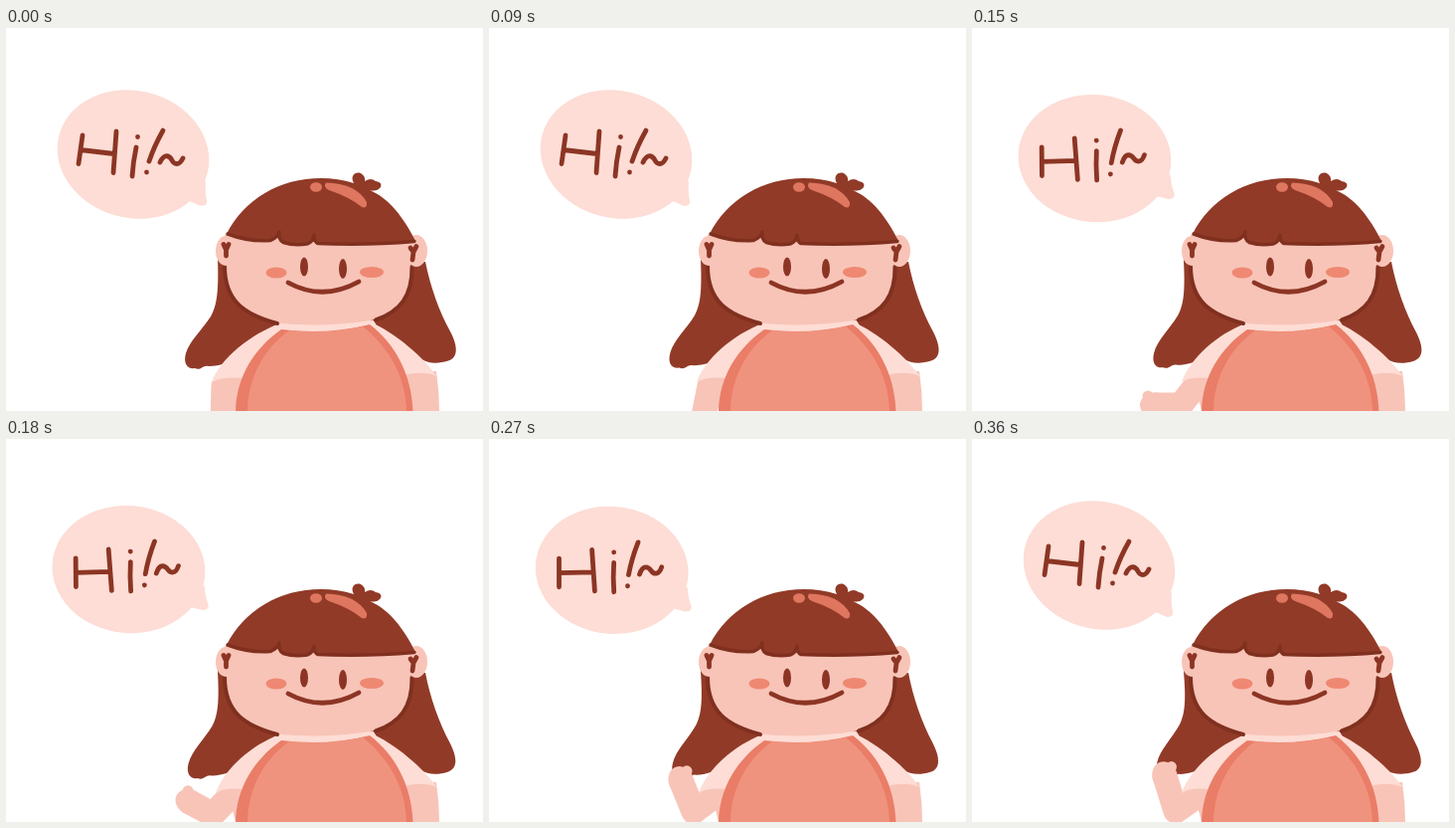
These frames come from a looping animation (480 px wide and 385 px high, 660 ms). An HTML page:

```html
<!DOCTYPE html>
<html lang="en">
<head>
<meta charset="utf-8">
<title>Hi!</title>
<style>
  html, body { margin: 0; width: 100%; height: 100%; overflow: hidden; background: #fff; }
  svg { display: block; width: 480px; height: 385px; }
  .line { fill: none; stroke: #8c3524; stroke-width: 4.8; stroke-linecap: round; stroke-linejoin: round; }
  .edge { fill: none; stroke: #80301f; stroke-width: 4; stroke-linecap: round; stroke-linejoin: round; }
  .hair { fill: #913a27; }
  .skin { fill: #f8c4b8; }
  .pale { fill: #fdddd5; }
  .ink { fill: #8c3524; }
  .blush { fill: #ef8872; }
  .shine { fill: #df7660; }
  .limb { fill: none; stroke: #f8c4b8; stroke-width: 25; stroke-linecap: round; stroke-linejoin: round; }
</style>
</head>
<body>
<svg viewBox="0 0 480 385">
  <g id="bubble">
    <ellipse class="pale" cx="128" cy="127" rx="77" ry="64" transform="rotate(14 128 127)"/>
    <path class="pale" d="M170 172Q182 173 187 175L195 178.500Q203 180 202 173Q200 166 201 154Z"/>
    <path class="line" d="M77 108L73 136.500M75 122.500L109 126.500M111 104L108 145.500M131 120Q128 134 127 149M132.500 109.500v.1M158 103Q149 119 144 134M141.500 145v.1M155 135C160 125 165 129 167 133S174 139 178 131"/>
  </g>

  <path class="hair" id="leftHair" d="M213 230C214 262 213 278 206 290C197 304 185 314 181 327C178 338 183 343 190 342C196 345 198 338 204 340Q212 340 222 337L280 300L225 230Z"/>
  <path class="hair" id="rightHair" d="M422 235C427 260 436 285 447 305C456 322 454 332 445 334.500C434 338 425 337 418 333L365 297L405 235Z"/>

  <path class="skin" d="M222 350H242L231 385Z"/>
  <path class="limb" id="arm"/>
  <g id="hand">
    <ellipse class="skin" rx="15" ry="12.500"/>
    <path class="limb" style="stroke-width:11" d="M2 4L7 9"/>
  </g>
  <path class="skin" d="M400 345H433Q436 365 436 385H400Z"/>
  <path class="pale" id="sleeve"/>
  <path class="pale" d="M365 295C392 306 421 332 433.500 350Q420 344 400 349L340 310Z"/>
  <path class="pale" d="M273 296L370 294L385 320H255Z"/>
  <path fill="#ea7d68" d="M231 385C232 350 250 322 277 303Q323 309 366 298C392 318 408 348 409.500 385Z"/>
  <path fill="#f0937e" d="M243 385C244 350 260 322 285 304Q323 308 359 300C386 322 402 350 403 385Z"/>

  <path class="skin" d="M220 208V238C219 277 240 288 275 297Q322 301 367 294C398 286 410 269 408 238V210Z"/>
  <path class="edge" d="M220 239C220 275 240 288 273 297M408.500 240C409 270 396 285 372 293.500"/>
  <ellipse class="skin" cx="221" cy="224" rx="10" ry="15"/>
  <ellipse class="skin" cx="413" cy="224" rx="11" ry="16"/>
  <path class="line" d="M219 217.500L221.500 223L224 217.500M221.500 223V229M407 221L410 225L413 219.500M410 225L409 233"/>

  <path class="hair" d="M222 207C240 172 275 151 317 151Q334 151 350 156C346 149 351 144 357 146Q362 149 361 154Q367 150 372 154Q379 155 377 160Q373 165 366 163C385 171 400 190 412 214Q365 219 313 218Q310 215 310 207Q309 215 303 217Q285 221 275 213V205Q273 212 266 214Q244 215 222 207Z"/>
  <path class="edge" style="stroke-width:3.500" d="M223 207Q244 215 266 213.500Q273 211 275 205Q274 213 279 215.500Q290 219 303 217Q309 215 310 208Q310 215 314 216.500Q365 218.500 411 214.500"/>
  <ellipse class="shine" cx="312" cy="160" rx="6" ry="4.800"/>
  <path class="shine" d="M322 155.500Q352 156 363 175Q364 182 358 180Q346 170 325 163Q319 160 322 155.500Z"/>

  <ellipse class="ink" cx="300" cy="240" rx="4" ry="9.500"/>
  <ellipse class="ink" cx="339" cy="242" rx="4" ry="10"/>
  <path class="line" d="M284 256Q319 275 355 255"/>
  <ellipse class="blush" cx="272" cy="246" rx="10.500" ry="5.500"/>
  <ellipse class="blush" cx="368" cy="245.500" rx="12" ry="5.500"/>
</svg>
<script>
  const LOOP = 660, STEP = 30, LAST = 12;
  const part = id => document.getElementById(id);
  const set = (id, name, value) => part(id).setAttribute(name, value);

  // step, elbow x, elbow y, hand x, hand y
  const armKeys = [
    [0, 218, 395, 218, 425],
    [2, 218, 395, 218, 425],
    [4, 214, 384, 202, 389],
    [5, 210, 379, 184, 379],
    [7, 206, 376, 186, 351],
    [10, 206, 374, 197, 340],
    [12, 205, 374, 194, 339]
  ];
  // Bubble tilt in degrees and drop in pixels for each swing
  const swings = [[5, 0], [8.5, 0], [8, 1]];

  function armPose(step) {
    const i = Math.max(1, armKeys.findIndex(key => key[0] >= step));
    const a = armKeys[i - 1], b = armKeys[i];
    const mix = (step - a[0]) / (b[0] - a[0]);
    return a.map((v, n) => v + (b[n] - v) * mix).slice(1);
  }

  function draw(step) {
    // Two steps tilted, two steps at rest
    const tilted = Math.floor((step + 1) / 2) % 2;
    const [tilt, drop] = tilted ? swings[Math.floor(step / 4)] : [0, 0];
    set('bubble', 'transform', `translate(0 ${drop}) rotate(${-tilt} 153 160)`);

    const sway = step * 0.28;
    set('leftHair', 'transform', `translate(0 ${-sway}) rotate(${-sway} 215 240)`);
    set('rightHair', 'transform', `rotate(${step * 0.06} 415 240)`);

    const [ex, ey, hx, hy] = armPose(step);
    const lift = Math.min(1, Math.max(0, (step - 2) / 2));
    const angle = Math.atan2(hy - ey, hx - ex) * 180 / Math.PI;
    set('arm', 'd', `M${219 + 6 * lift} 360L${ex} ${ey}L${hx} ${hy}`);
    set('hand', 'transform', `translate(${hx} ${hy}) rotate(${angle})`);

    const cuff = 207 + 4 * lift;
    set('sleeve', 'd', `M275 297C247 308 ${cuff + 9} 331 ${cuff} 356Q222 349 242 353L290 310Z`);
  }

  function tick() {
    draw(Math.min(LAST, Math.floor(performance.now() % LOOP / STEP)));
    requestAnimationFrame(tick);
  }
  tick();
</script>
</body>
</html>
```
